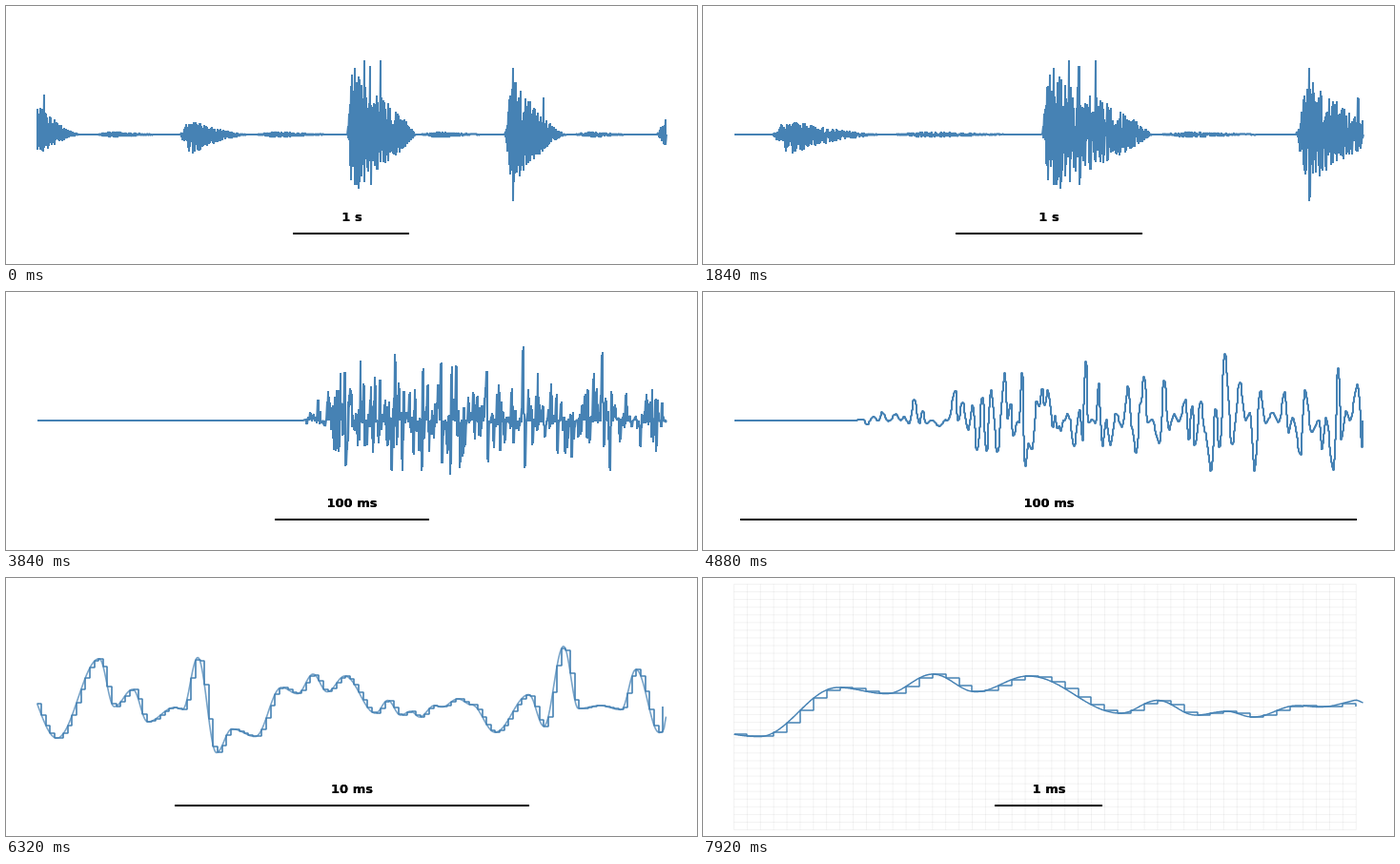
An HTML page with a canvas for the animation above (8 s loop, 725 by 271 pixels).

```html
<!DOCTYPE html>
<html lang="en">
<head>
<meta charset="utf-8">
<title>Waveform zoom</title>
<style>
html, body { margin: 0; width: 100%; height: 100%; overflow: hidden; background: #fff; }
canvas { display: block; }
</style>
</head>
<body>
<canvas id="stage" width="725" height="271"></canvas>
<script>
const ctx = document.getElementById('stage').getContext('2d');
const LEFT = 32.5, WIDTH = 660, CX = LEFT + WIDTH / 2, MID = 135;
const LOOP = 8000, HOLD = 560, STEP = 80;
const RATE = 8;              // audio samples per ms
const HALF = 2760, RES = 64; // table: ms on each side, entries per ms

const lerp = (a, b, k) => a + (b - a) * k;
const clamp = (v, lo, hi) => Math.min(hi, Math.max(lo, v));

let seed = 20;
function rnd() {
  seed = (seed * 1664525 + 1013904223) % 4294967296;
  return seed / 4294967296;
}

// Times are in ms from the centre of the picture
const sounds = [
  { start: -2790, length: 440, attack: 0.12, up: 38, down: 27, fall: 1.5 },
  { start: -1495, length: 640, attack: 0.12, up: 21, down: 27, fall: 1.6 },
  { start: -32, length: 590, attack: 0.05, up: 70, down: 60, fall: 0.8 },
  { start: 1340, length: 550, attack: 0.12, up: 72, down: 66, fall: 1.4 },
  { start: 2670, length: 400, attack: 0.25, up: 30, down: 21, fall: 1 }
];
// Quiet breaths between the sounds
for (const [start, length] of [[-2240, 560], [-850, 680], [590, 600], [1950, 470]]) {
  sounds.push({ start, length, attack: 0.3, up: 5, down: 5, fall: 1 });
}

function envelope(t, side) {
  let sum = 0;
  for (const s of sounds) {
    const p = (t - s.start) / s.length;
    if (p > 0 && p < 1) sum += s[side] * Math.min(1, p / s.attack) * (1 - p) ** s.fall;
  }
  return sum;
}

// Key turning points [time, height]: the part that fills the closest view
const core = [
  [-5.02, 1], [-4.79, 3], [-4.36, -51.5], [-3.83, 48.5], [-3.39, 23.5], [-2.73, 31.5],
  [-1.99, -20], [-1.53, -13.5], [-1.09, -34], [-0.69, -15.5], [-0.19, -32], [0.68, 7],
  [1.03, -6.5], [1.39, 9], [1.68, 5], [1.93, 11], [2.35, -1], [2.56, 0.5], [3.02, -8],
  [3.4, -2], [4.07, 27], [5.03, -12.5]
];
// and the tallest peaks elsewhere
const peaks = [
  [-2688, -42], [-9.4, -32], [10, 26], [12.9, -36], [14.2, 34], [15.5, -46],
  [26.4, 53], [28.6, -70], [65, 57], [66, -57], [89, -52], [113, -78], [114, 50],
  [165, -72], [170, 53], [256, -78], [1412, -70], [1413, 70], [1676, -39]
];
const keys = [[-HALF - 1, 0], ...core, ...peaks, [HALF + 1, 0]].sort((a, b) => a[0] - b[0]);

// Seeded noise fills the time between the keys
const knots = [];
keys.forEach(([t, y], i) => {
  knots.push([t, y]);
  if (i + 1 === keys.length) return;
  const end = keys[i + 1][0] - 0.4;
  let above = y > 0;
  for (let u = t + 0.4 + 0.9 * rnd(); u < end; u += 0.4 + 0.9 * rnd()) {
    const gain = rnd() ** 2;
    knots.push([u, gain * (above ? -envelope(u, 'up') : envelope(u, 'down'))]);
    above = !above;
  }
});

const table = new Float32Array(2 * HALF * RES + 1);
for (let i = 0, j = 0; i < table.length; i++) {
  const t = i / RES - HALF;
  while (knots[j + 1][0] < t) j++;
  const [t0, y0] = knots[j], [t1, y1] = knots[j + 1];
  table[i] = lerp(y0, y1, (1 - Math.cos(Math.PI * (t - t0) / (t1 - t0))) / 2);
}

const indexAt = t => clamp((t + HALF) * RES, 0, table.length - 1.001);

function wave(t) {
  const p = indexAt(t), i = Math.floor(p);
  return lerp(table[i], table[i + 1], p - i);
}

// Pixels per ms: about a thousandfold zoom, eased on a log scale
const zoomAt = n => 0.1201 * Math.exp(6.92 * (1 - Math.cos(Math.PI * n / 100.3)) / 2);

// Line to a whole pixel, for crisp strokes
const snap = (x, y) => ctx.lineTo(Math.round(x), Math.round(y));

function drawGrid(n, pitch, count) {
  const rows = 32, top = 6.5, height = 258;
  ctx.strokeStyle = `rgba(0,0,0,${0.05 * clamp((n - 82) / 11, 0, 1)})`;
  ctx.lineWidth = 1;
  ctx.beginPath();
  for (let k = 0; k <= count; k++) {
    ctx.moveTo(LEFT + k * pitch, top);
    ctx.lineTo(LEFT + k * pitch, top + height);
  }
  for (let k = 0; k <= rows; k++) {
    ctx.moveTo(LEFT, top + k * height / rows);
    ctx.lineTo(LEFT + count * pitch, top + k * height / rows);
  }
  ctx.stroke();
}

// Many samples per pixel: join the extremes of each column
function drawDense(start, s) {
  for (let x = 0; x < WIDTH; x++) {
    const to = indexAt(start + (x + 1) / s);
    let lo = Infinity, hi = -Infinity;
    for (let i = Math.floor(indexAt(start + x / s)); i <= to; i++) {
      lo = Math.min(lo, table[i]);
      hi = Math.max(hi, table[i]);
    }
    snap(LEFT + x, MID + lo);
    snap(LEFT + x, MID + hi);
  }
  snap(LEFT + WIDTH, MID);
}

function drawSteps(start, pitch, count) {
  for (let k = 0; k < count; k++) {
    const y = MID + wave(start + k / RATE);
    snap(LEFT + k * pitch, y);
    snap(LEFT + (k + 1) * pitch, y);
  }
  snap(LEFT + count * pitch, MID);
}

function drawSmooth(start, s, pitch) {
  ctx.beginPath();
  for (let x = 0; x <= WIDTH; x++) {
    const fall = Math.min(1, 0.5 + (WIDTH - x) / pitch);
    ctx.lineTo(LEFT + x, MID + wave(start + x / s) * fall);
  }
  ctx.stroke();
}

function drawBar(s) {
  const ms = 10 ** Math.floor(Math.log10(WIDTH / s));
  const width = ms * s + 2;
  ctx.fillStyle = '#000';
  ctx.fillRect(Math.round(CX - width / 2), 238, Math.round(width), 2);
  ctx.font = 'bold 13px "DejaVu Sans", sans-serif';
  ctx.textAlign = 'center';
  const label = ms >= 1000 ? '1 s' : ms + ' ms';
  // Twice, for heavier edges
  ctx.fillText(label, 363, 226);
  ctx.fillText(label, 363, 226);
}

function draw(n) {
  const s = zoomAt(n), span = WIDTH / s, start = -span / 2;
  const pitch = s / RATE, count = Math.floor(span * RATE);
  const near = clamp((n - 62) / 15, 0, 1);
  ctx.fillStyle = '#fff';
  ctx.fillRect(0, 0, 725, 271);
  if (n > 82) drawGrid(n, pitch, count);
  ctx.strokeStyle = '#4682b4';
  ctx.lineWidth = lerp(2, 1.5, near);
  ctx.lineJoin = 'bevel';
  ctx.beginPath();
  if (s < 3) drawDense(start, s);
  else drawSteps(start, pitch, count);
  ctx.stroke();
  if (near) {
    ctx.globalAlpha = near;
    drawSmooth(start, s, pitch);
    ctx.globalAlpha = 1;
  }
  drawBar(s);
}

let shown = -1;
function tick() {
  const t = performance.now() % LOOP;
  const n = t < HOLD ? 0 : Math.floor((t - HOLD) / STEP) + 1;
  if (n !== shown) draw(shown = n);
  requestAnimationFrame(tick);
}
tick();
</script>
</body>
</html>
```
